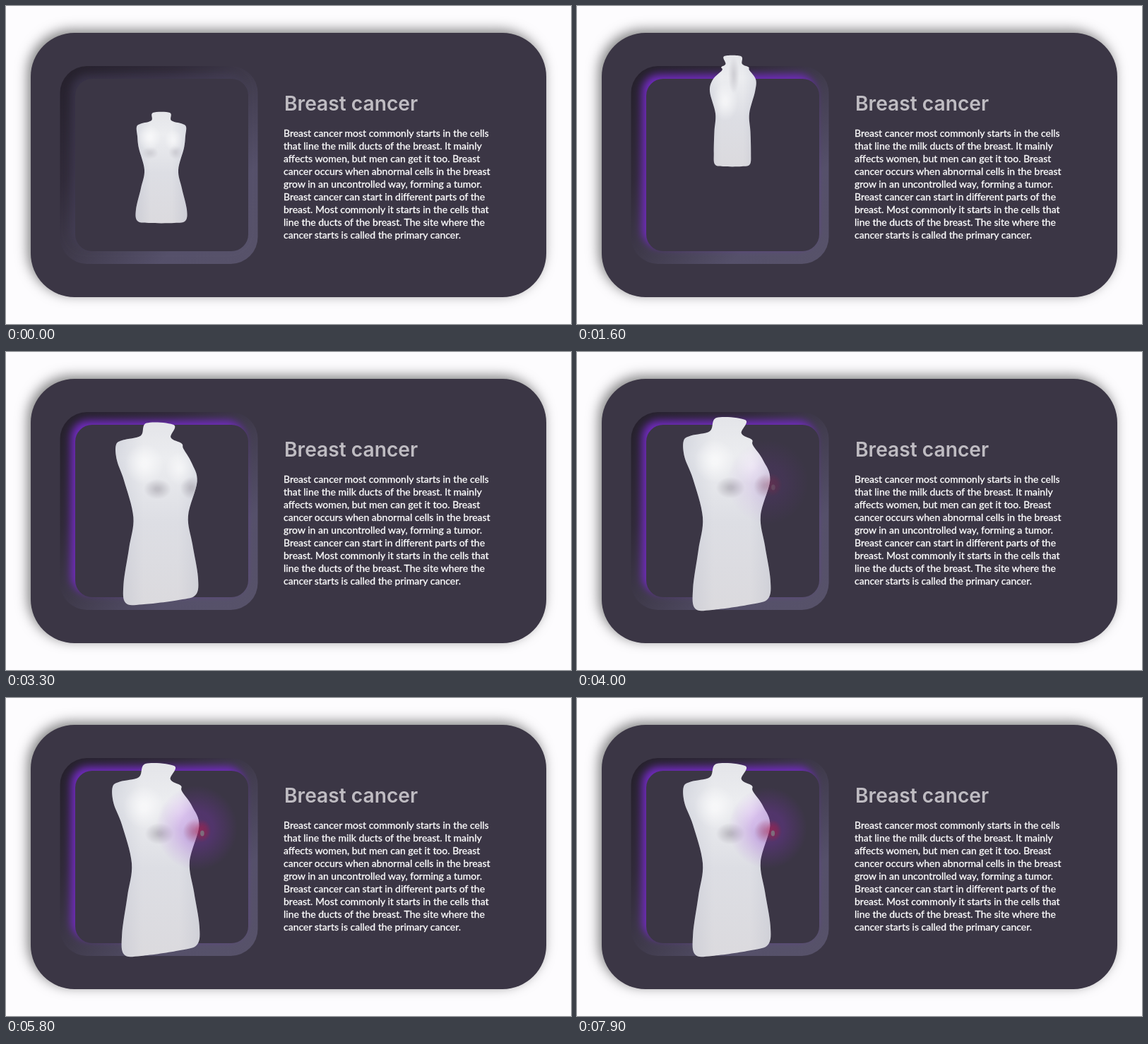
Recreate the animation shown at these times as an HTML page with a canvas. Size 800 by 450 pixels, loop 8000 ms.

```html
<!DOCTYPE html>
<html lang="en">
<head>
<meta charset="utf-8">
<title>Breast cancer</title>
<style>
html, body { margin: 0; width: 800px; height: 450px; overflow: hidden; background: #fdfcfe; }
canvas { position: absolute; left: 0; top: 0; }
h1, p { position: absolute; margin: 0; white-space: nowrap; }
h1 { left: 394px; top: 124px; font: 600 28.2px/28px Inter, sans-serif; font-optical-sizing: none; color: #bfbcc2; }
p { left: 393px; top: 171px; font: 400 14px/18px Lato, sans-serif; color: #fff; -webkit-text-stroke: .3px #fff; }
</style>
</head>
<body>
<canvas id="stage" width="800" height="450"></canvas>
<h1>Breast cancer</h1>
<p>Breast cancer most commonly starts in the cells<br>
that line the milk ducts of the breast. It mainly<br>
affects women, but men can get it too. Breast<br>
cancer occurs when abnormal cells in the breast<br>
grow in an uncontrolled way, forming a tumor.<br>
Breast cancer can start in different parts of the<br>
breast. Most commonly it starts in the cells that<br>
line the ducts of the breast. The site where the<br>
cancer starts is called the primary cancer.</p>
<script>
const ctx = document.getElementById('stage').getContext('2d');
const LOOP = 8000, STEP = 100;
const TOP = 150, BASE = 307;

const clamp = v => Math.min(1, Math.max(0, v));
const span = (t, a, b) => clamp((t - a) / (b - a));
const mix = (a, b, k) => a + (b - a) * k;
const smooth = p => p * p * (3 - 2 * p);
const smoother = p => p * p * p * (p * (p * 6 - 15) + 10);
const bump = p => Math.sin(Math.PI * p);
const bell = (y, mid, width) => Math.exp(-(((y - mid) / width) ** 2));

// Half width and height of the torso seen from the front, neck to base.
const profile = [[12, 151], [14, 162], [29, 166.5], [35, 171], [34, 184], [32, 201],
  [24, 232], [29, 258], [36, 288], [34, 304], [18, 307]];

// Turning narrows shoulders and hips; lean moves the shoulders, tilt slants the base.
function outline(turn, lean, tilt) {
  const edge = sign => profile.map(([w, y]) => {
    const thin = 0.45 * bell(y, 172, 10) + 0.27 * smooth(span(y, 235, 285));
    const slant = tilt * sign * w / 36 * (211 - y) * 0.048;
    return [lean * bell(y, 174, 13) + sign * w * (1 - turn * thin), y + slant];
  });
  return [...edge(1), ...edge(-1).reverse()];
}

function box(x, y, w, h, r) {
  ctx.beginPath();
  ctx.roundRect(x, y, w, h, r);
}

function ramp(x0, y0, x1, y1, stops) {
  const g = ctx.createLinearGradient(x0, y0, x1, y1);
  stops.forEach(([p, c]) => g.addColorStop(p, c));
  return g;
}

function shadow(color, blur, offset) {
  ctx.shadowColor = color;
  ctx.shadowBlur = blur;
  ctx.shadowOffsetX = ctx.shadowOffsetY = offset;
}

function blob(x, y, rx, ry, rgb, alpha, hold = 0.15) {
  ctx.save();
  ctx.translate(x, y);
  ctx.scale(rx, ry);
  const g = ctx.createRadialGradient(0, 0, 0, 0, 0, 1);
  g.addColorStop(hold, `rgba(${rgb},${alpha})`);
  g.addColorStop(1, `rgba(${rgb},0)`);
  ctx.fillStyle = g;
  ctx.fillRect(-1, -1, 2, 2);
  ctx.restore();
}

// Closed smooth curve through all points.
function curve(pts) {
  const n = pts.length, at = i => pts[(i + n) % n];
  ctx.beginPath();
  ctx.moveTo(...pts[0]);
  for (let i = 0; i < n; i++) {
    const [a, b, c, d] = [at(i - 1), at(i), at(i + 1), at(i + 2)];
    ctx.bezierCurveTo(b[0] + (c[0] - a[0]) / 6, b[1] + (c[1] - a[1]) / 6,
      c[0] - (d[0] - b[0]) / 6, c[1] - (d[1] - b[1]) / 6, c[0], c[1]);
  }
  ctx.closePath();
}

function drawCard() {
  ctx.fillStyle = '#fdfcfe';
  ctx.fillRect(0, 0, 800, 450);
  ctx.save();
  shadow('rgba(0,0,0,.5)', 17, -4);
  ctx.fillStyle = '#3b3645';
  box(35, 38, 730, 374, 62);
  ctx.fill();
  ctx.restore();
}

function drawFrame(lit) {
  ctx.save();
  box(76.5, 85, 280, 280, 38);
  ctx.clip();
  ctx.fillStyle = ramp(76, 85, 356, 365,
    [[0, '#241f2b'], [0.3, '#302a39'], [0.5, '#3f3a4b'], [0.75, '#55506a'], [1, '#575269']]);
  ctx.fillRect(76, 85, 281, 281);
  const tint = `${mix(71, 112, lit)},${mix(65, 42, lit)},${mix(96, 190, lit)}`;
  shadow(`rgba(${tint},${mix(0.5, 1, lit)})`, 12, -6);
  ctx.fillStyle = '#3b3645';
  box(98, 103, 245, 244, 24);
  ctx.fill();
  ctx.restore();
}

function drawTorso(t) {
  const p = span(t, 1150, 2050);
  const angle = 2 * Math.PI * (1 - (1 - p) ** 2);
  const sin = Math.sin(angle), spin = sin * sin;
  const zoom = smoother(span(t, 2500, 3600));
  const lift = 320 * p * (1 - p);
  const crouch = 0.06 * bump(span(t, 900, 1150));
  const squash = crouch + 0.02 * bump(span(t, 2000, 2350));
  const pivot = crouch > 0 ? BASE : TOP;
  const scale = mix(1, 1.707, zoom);

  ctx.save();
  ctx.translate(mix(220, 219, zoom), mix(TOP, 93, zoom) - lift);
  ctx.scale(scale, scale);
  ctx.translate(0, pivot - TOP);
  ctx.scale(1 + 0.7 * squash, 1 - squash);
  ctx.translate(0, -pivot);
  curve(outline(spin + 0.4 * zoom, -5 * sin * Math.abs(sin) - 11.7 * zoom, zoom));
  ctx.clip();

  ctx.fillStyle = ramp(0, TOP, 0, BASE, [[0, '#e4e5e9'], [0.2, '#ecedf0'], [0.55, '#dddee4'], [1, '#dbdade']]);
  ctx.fillRect(-60, 130, 120, 190);
  const edge = 'rgba(160,165,185,.25)', clear = 'rgba(160,165,185,0)';
  ctx.fillStyle = ramp(-38, 0, 38, 0, [[0, edge], [0.3, clear], [0.7, clear], [1, edge]]);
  ctx.fillRect(-60, 130, 120, 190);

  const face = clamp(Math.cos(angle)) * (1 - spin);
  const soft = '150,146,156', white = '255,255,255';
  const dark = mix(0.25, 0.5, zoom) * face;
  blob(mix(-16, -1, zoom), 208, 12, 9, soft, dark);
  blob(mix(20, 28, zoom), 207, 10, 10, soft, dark);
  blob(mix(-17, -14, zoom), 186, 17, 18, white, 0.6 * face);
  blob(17, 190, 13, 15, white, 0.5 * face);
  blob(-10, 215, 18, 28, white, 0.6 * spin);
  blob(2, 178, 8, 26, soft, 0.3 * spin);
  ctx.restore();
}

function drawGlow(t) {
  const fade = span(t, 3700, 4500);
  const pulse = 0.5 - 0.5 * Math.cos(2 * Math.PI * (t - 4700) / 1800);
  const s = 1 + 0.08 * pulse;
  ctx.save();
  ctx.globalAlpha = fade;
  blob(270, 184, 54 * s, 56 * s, '145,50,215', 0.26, 0.4);
  blob(270, 188, 18 * s, 17 * s, '190,40,80', 0.35);
  blob(279, 188, 11 * s, 15 * s, '190,20,60', 0.28, 0.4);
  ctx.fillStyle = 'rgba(125,120,130,.85)';
  ctx.beginPath();
  ctx.ellipse(277 + pulse, 191.5, 2.6 * s, 3.8 * s, 0, 0, 2 * Math.PI);
  ctx.fill();
  ctx.restore();
}

const start = performance.now();
function draw(now) {
  const t = Math.floor((Math.max(0, now - start) % LOOP) / STEP) * STEP;
  drawCard();
  drawFrame(span(t, 0, 900));
  drawTorso(t);
  drawGlow(t);
  requestAnimationFrame(draw);
}
draw(start);
</script>
</body>
</html>
```
